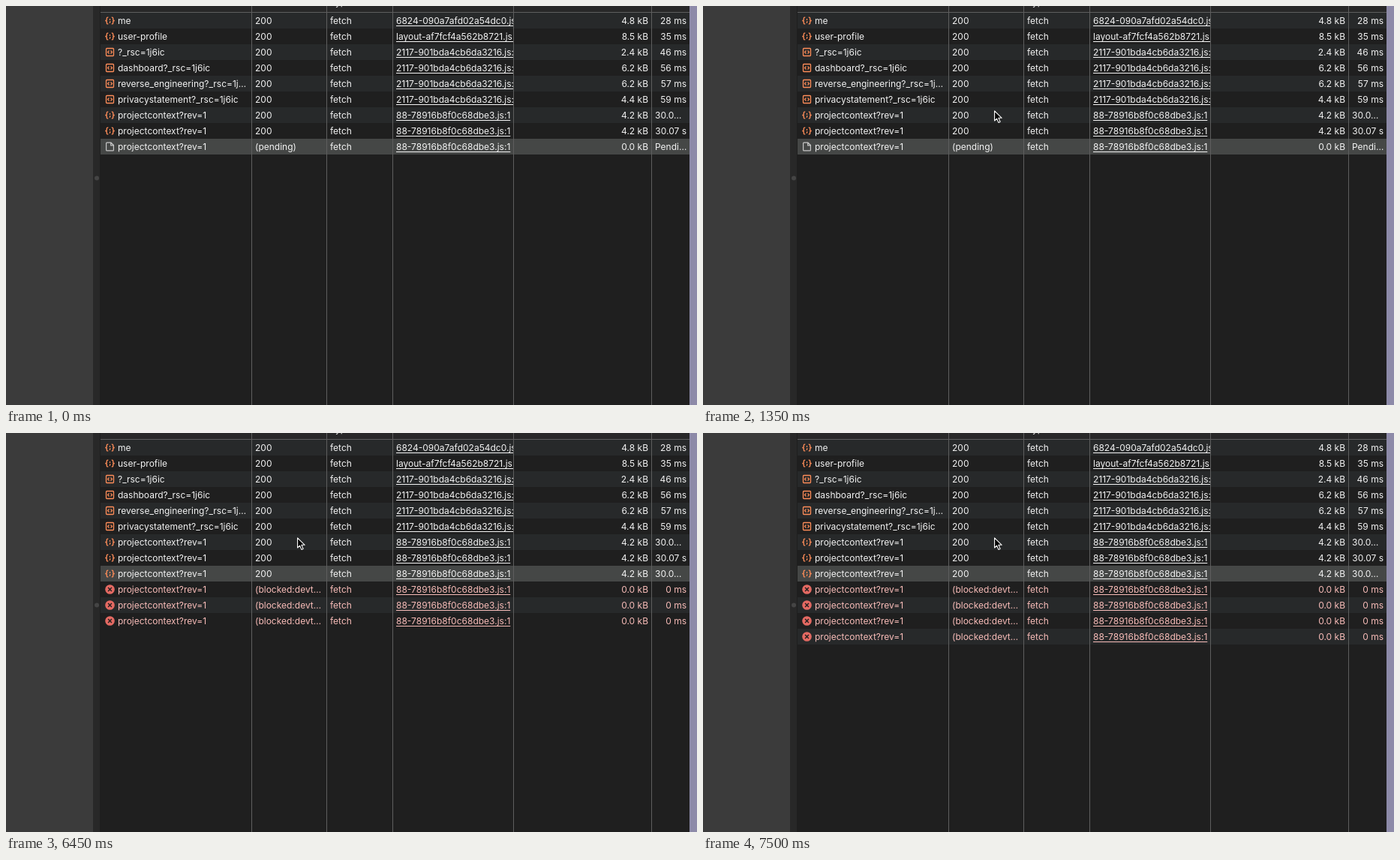
Write an HTML page with a canvas that moves like this. It is 921 px wide and 532 px high and loops after 8 s.

```html
<!DOCTYPE html>
<html lang="en">
<head>
<meta charset="utf-8">
<title>Network log</title>
<style>
  html, body { margin: 0; width: 100%; height: 100%; overflow: hidden; background: #1f1f1f; }
  canvas { position: absolute; left: 0; top: 0; }
  .row {
    position: absolute; left: 0; width: 921px; height: 21px;
    font: 12px/21px Inter, Roboto, sans-serif;
    color: #f3f3f3; white-space: pre;
  }
  .row span { position: absolute; top: 0; height: 21px; overflow: hidden; }
  .name { left: 149px; width: 177px; }
  .status { left: 332px; width: 95px; }
  .type { left: 432px; width: 82px; }
  .link { left: 520px; width: 156px; text-decoration: underline 1px; text-underline-offset: 2px; }
  .size { right: 65px; }
  .time { right: 14px; }
  .row .cut { left: 865px; right: auto; }
  .failed { color: #f8bcb8; }
</style>
</head>
<body>
<canvas id="stage" width="921" height="532"></canvas>
<script>
const W = 921, H = 532, LOOP = 8000;
const TOP = 9, PITCH = 21, SELECTED = 8, DONE = 4350;
const ORANGE = '#fe8d59';
const ctx = document.getElementById('stage').getContext('2d');

const chunk = '2117-901bda4cb6da3216.js:1';
const poll = '88-78916b8f0c68dbe3.js:1';
const context = 'projectcontext?rev=1';

const entry = (icon, name, link, size, time, status = '200', from = 0, to = LOOP, slot) =>
  ({ icon, name, link, size, time, status, from, to, slot });

const failed = (slot, from) =>
  entry('error', context, poll, '0.0 kB', '0 ms', '(blocked:devt…', from, LOOP, slot);

const rows = [
  entry('json', 'me', '6824-090a7afd02a54dc0.js:1', '4.8 kB', '28 ms'),
  entry('json', 'user-profile', 'layout-af7fcf4a562b8721.js:1', '8.5 kB', '35 ms'),
  entry('code', '?_rsc=1j6ic', chunk, '2.4 kB', '46 ms'),
  entry('code', 'dashboard?_rsc=1j6ic', chunk, '6.2 kB', '56 ms'),
  entry('code', 'reverse_engineering?_rsc=1j…', chunk, '6.2 kB', '57 ms'),
  entry('code', 'privacystatement?_rsc=1j6ic', chunk, '4.4 kB', '59 ms'),
  entry('json', context, poll, '4.2 kB', '30.0…'),
  entry('json', context, poll, '4.2 kB', '30.07 s'),
  entry('file', context, poll, '0.0 kB', 'Pendi…', '(pending)', 0, DONE),
  entry('json', context, poll, '4.2 kB', '30.0…', '200', DONE, LOOP, SELECTED),
  failed(9, DONE), failed(10, 5400), failed(11, 6450), failed(12, 7350)
];

function addCell(parent, cls, text) {
  const cell = document.createElement('span');
  cell.className = cls;
  cell.textContent = text;
  parent.append(cell);
}

function addLine(y) {
  const line = document.createElement('div');
  line.className = 'row';
  line.style.top = y + 'px';
  document.body.append(line);
  return line;
}

rows.forEach((row, i) => {
  row.slot ??= i;
  row.y = TOP + row.slot * PITCH;
  row.line = addLine(row.y);
  row.line.classList.toggle('failed', row.icon === 'error');
  for (const key of ['name', 'status', 'link', 'size']) addCell(row.line, key, row[key]);
  addCell(row.line, 'type', 'fetch');
  addCell(row.line, row.time.endsWith('…') ? 'time cut' : 'time', row.time);
});
addCell(addLine(-16), 'type', 'Type');

function rect(color, x, y, w, h) {
  ctx.fillStyle = color;
  ctx.fillRect(x, y, w, h);
}

function disc(color, x, y, r) {
  ctx.fillStyle = color;
  ctx.beginPath();
  ctx.arc(x, y, r, 0, Math.PI * 2);
  ctx.fill();
}

function stroke(color, width, d) {
  ctx.strokeStyle = color;
  ctx.lineWidth = width;
  ctx.stroke(new Path2D(d));
}

const brace = 'M-2.2-4.4H-3Q-4.2-4.4-4.2-3.2V-1.6Q-4.2 0-6.2 0Q-4.2 0-4.2 1.6V3.2Q-4.2 4.4-3 4.4H-2.2';

const icons = {
  json() {
    stroke(ORANGE, 1.3, brace);
    ctx.save();
    ctx.scale(-1, 1);
    stroke(ORANGE, 1.3, brace);
    ctx.restore();
    disc(ORANGE, 0, -1.6, 0.9);
    stroke(ORANGE, 1.3, 'M.3 .8V1.8L-.6 3.2');
  },
  code() {
    ctx.strokeStyle = ORANGE;
    ctx.lineWidth = 1.3;
    ctx.beginPath();
    ctx.roundRect(-5, -5, 10, 10, 1);
    ctx.stroke();
    stroke(ORANGE, 1.2, 'M-1-2L-3 0L-1 2M1-2L3 0L1 2');
  },
  file() {
    stroke('#c7c7c7', 1.2, 'M-4.9-4.5Q-4.9-5.4-4-5.4H1.4L4.9-1.9V4.5Q4.9 5.4 4 5.4H-4Q-4.9 5.4-4.9 4.5ZM1.2-5.2V-1.7H4.7');
  },
  error() {
    disc('#e46962', 0, 0, 6.3);
    stroke('#1f1f1f', 1.4, 'M-2.4-2.4L2.4 2.4M2.4-2.4L-2.4 2.4');
  }
};

const arrow = new Path2D('M.6 .8V14L3.6 11.2L5.9 16.4L8.1 15.4L5.9 10.3H10.2Z');

function drawPointer(t) {
  if (t < 600) return;
  const [x, y] = t < 750 ? [394, 110] : [388, t < 1350 ? 136 : 139];
  ctx.save();
  ctx.translate(x, y);
  ctx.fillStyle = '#000';
  ctx.fill(arrow);
  ctx.strokeStyle = '#fff';
  ctx.lineWidth = 1.1;
  ctx.lineJoin = 'round';
  ctx.stroke(arrow);
  ctx.restore();
}

function drawPanel() {
  rect('#1f1f1f', 0, 0, W, H);
  rect('#3b3b3b', 0, 0, 116, H);
  rect('#282828', 116, 0, 9, H);
  disc('#454545', 121, 229.5, 3);
  rect('#282828', 126, 0, 785, 8);
}

function drawGrid() {
  rect('#5e5e5e', 126, 8, 785, 1);
  for (const x of [327, 427, 515, 676, 860]) rect('#5e5e5e', x, 0, 1, H);
  rect('#8d8aa8', 911, 0, 10, H);
}

function draw(t) {
  drawPanel();
  for (const row of rows) {
    const shown = t >= row.from && t < row.to;
    row.line.style.visibility = shown ? 'visible' : 'hidden';
    if (!shown) continue;
    if (row.slot === SELECTED) rect('#454746', 126, row.y, 785, PITCH);
    else if (row.slot % 2 === 0) rect('#27292a', 126, row.y, 785, PITCH);
    ctx.save();
    ctx.translate(138.5, row.y + 10.5);
    icons[row.icon]();
    ctx.restore();
  }
  drawGrid();
  drawPointer(t);
}

const start = performance.now();
function tick() {
  draw((performance.now() - start) % LOOP);
  requestAnimationFrame(tick);
}
tick();
</script>
</body>
</html>
```
